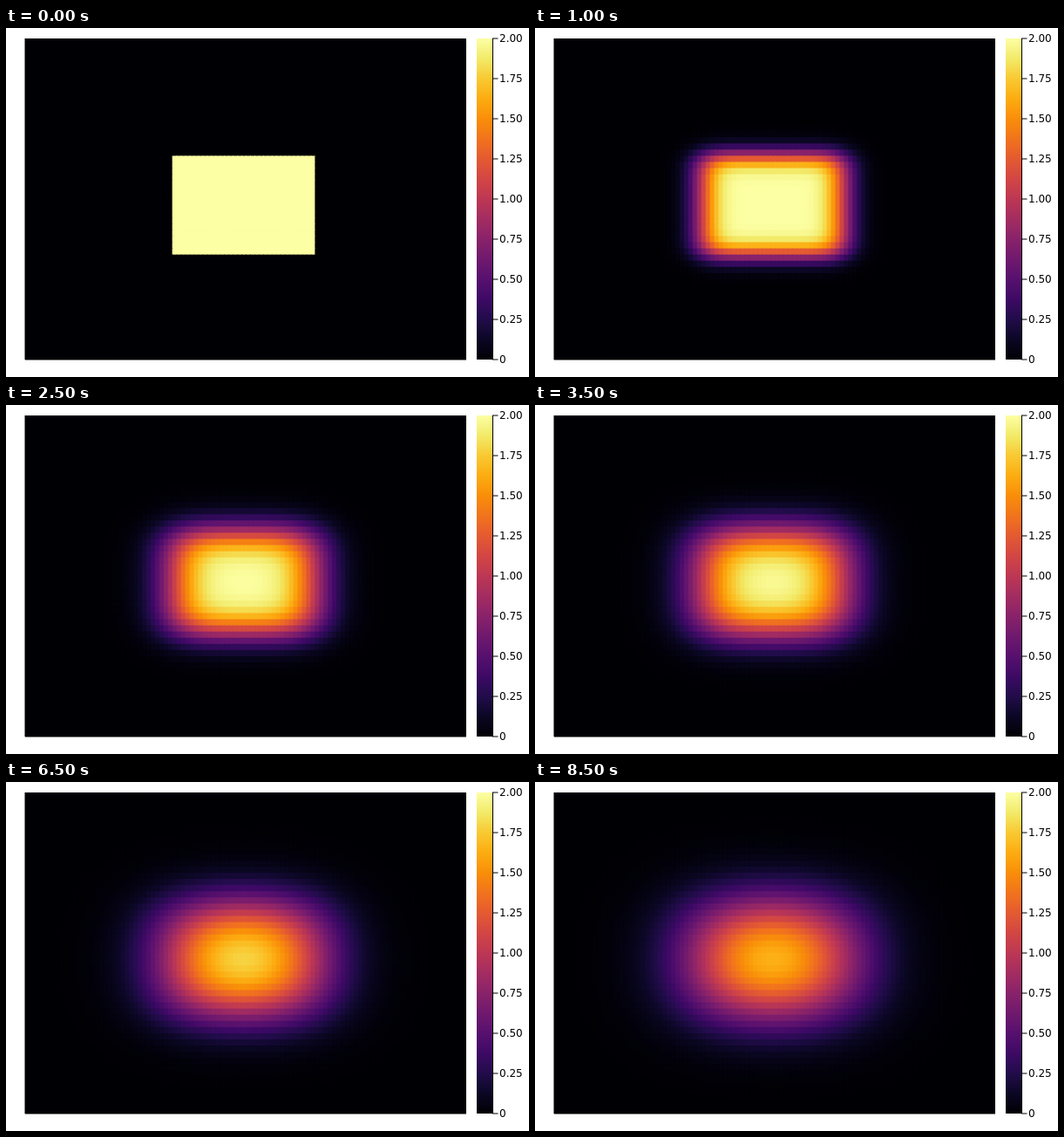
Write an HTML page with a canvas that moves like this. It is 600 px wide and 400 px high and loops after 9500 ms.

```html
<!DOCTYPE html>
<html lang="en">
<head>
<meta charset="utf-8">
<title>Heat diffusion</title>
<style>
  html, body { margin: 0; width: 100%; height: 100%; overflow: hidden; background: #fff; }
  canvas { display: block; }
</style>
</head>
<body>
<canvas id="stage" width="600" height="400"></canvas>
<script>
const ctx = document.getElementById('stage').getContext('2d');

const LOOP = 9500, STEP = 500, LAST = 17;
const PLOT = { x: 22, y: 12, w: 506, h: 368 };
const BAR = { x: 540, w: 18 };
const NX = 102, NY = 52;
const RX = 0.25, RY = RX / 4;   // dy = 2 dx
const SUBSTEPS = 11;
const VMAX = 2;

const INFERNO = [
  '000004', '0b0724', '210c4a', '3d0965', '57106e', '6f196e', '89226a', 'a32c61', 'bc3754',
  'd24644', 'e45a31', 'f1731d', 'f98e09', 'fcac11', 'f9c932', 'f2ea69', 'fcffa4'
].map(hex => [0, 2, 4].map(i => parseInt(hex.slice(i, i + 2), 16)));

function inferno(v) {
  const p = Math.min(Math.max(v, 0), 1) * (INFERNO.length - 1);
  const i = Math.min(Math.floor(p), INFERNO.length - 2);
  const rgb = INFERNO[i].map((c, k) => Math.round(c + (INFERNO[i + 1][k] - c) * (p - i)));
  return `rgb(${rgb})`;
}

function initialField() {
  const u = new Float64Array(NX * NY);
  for (let j = 19; j < 35; j++) u.fill(VMAX, j * NX + 34, j * NX + 67);
  return u;
}

function diffuse(u) {
  const next = u.slice();
  for (let j = 1; j < NY - 1; j++) {
    for (let i = 1; i < NX - 1; i++) {
      const k = j * NX + i;
      next[k] = u[k] + RX * (u[k - 1] - 2 * u[k] + u[k + 1])
                     + RY * (u[k - NX] - 2 * u[k] + u[k + NX]);
    }
  }
  return next;
}

const fields = [initialField()];
for (let n = 1; n <= LAST; n++) {
  let u = fields[n - 1];
  for (let s = 0; s < SUBSTEPS; s++) u = diffuse(u);
  fields.push(u);
}

function line(x1, y1, x2, y2) {
  ctx.beginPath();
  ctx.moveTo(x1, y1);
  ctx.lineTo(x2, y2);
  ctx.stroke();
}

function drawHeatmap(u) {
  const cw = PLOT.w / NX, ch = PLOT.h / NY;
  ctx.save();
  ctx.beginPath();
  ctx.rect(PLOT.x, PLOT.y, PLOT.w, PLOT.h);
  ctx.clip();
  ctx.fillStyle = inferno(0);
  ctx.fillRect(PLOT.x, PLOT.y, PLOT.w, PLOT.h);
  // Cells overlap the next one slightly so that no seams show.
  for (let j = 0; j < NY; j++) {
    for (let i = 0; i < NX; i++) {
      ctx.fillStyle = inferno(u[j * NX + i] / VMAX);
      ctx.fillRect(PLOT.x + i * cw, PLOT.y + j * ch, cw + 1, ch + 1);
    }
  }
  ctx.restore();
}

function drawColorbar() {
  const bottom = PLOT.y + PLOT.h, right = BAR.x + BAR.w;
  const ramp = ctx.createLinearGradient(0, bottom, 0, PLOT.y);
  for (let i = 0; i <= 64; i++) ramp.addColorStop(i / 64, inferno(i / 64));
  ctx.fillStyle = ramp;
  ctx.fillRect(BAR.x, PLOT.y, BAR.w, PLOT.h);

  line(right + 0.5, PLOT.y, right + 0.5, bottom);
  ctx.fillStyle = '#000';
  ctx.font = '12px "DejaVu Sans", sans-serif';
  for (let i = 0; i <= 8; i++) {
    const y = bottom - i * PLOT.h / 8;
    line(right, y, right + 6.5, y);
    ctx.fillText(i ? (i / 4).toFixed(2) : '0', right + 8, y + 4.4);
  }
}

function draw(n) {
  ctx.fillStyle = '#fff';
  ctx.fillRect(0, 0, 600, 400);
  drawHeatmap(fields[n]);
  ctx.strokeStyle = '#000';
  ctx.lineWidth = 1;
  line(PLOT.x, PLOT.y, PLOT.x, PLOT.y + PLOT.h);
  line(PLOT.x, PLOT.y + PLOT.h, PLOT.x + PLOT.w, PLOT.y + PLOT.h);
  drawColorbar();
}

// The last states are each held for two steps.
function stateAt(time) {
  const n = Math.floor(time / STEP);
  return n <= 13 ? n : Math.min(n - (n - 13) % 2, LAST);
}

const start = performance.now();
let shown = -1;
function tick() {
  const n = stateAt((performance.now() - start) % LOOP);
  if (n !== shown) draw(shown = n);
  requestAnimationFrame(tick);
}
tick();
</script>
</body>
</html>
```
